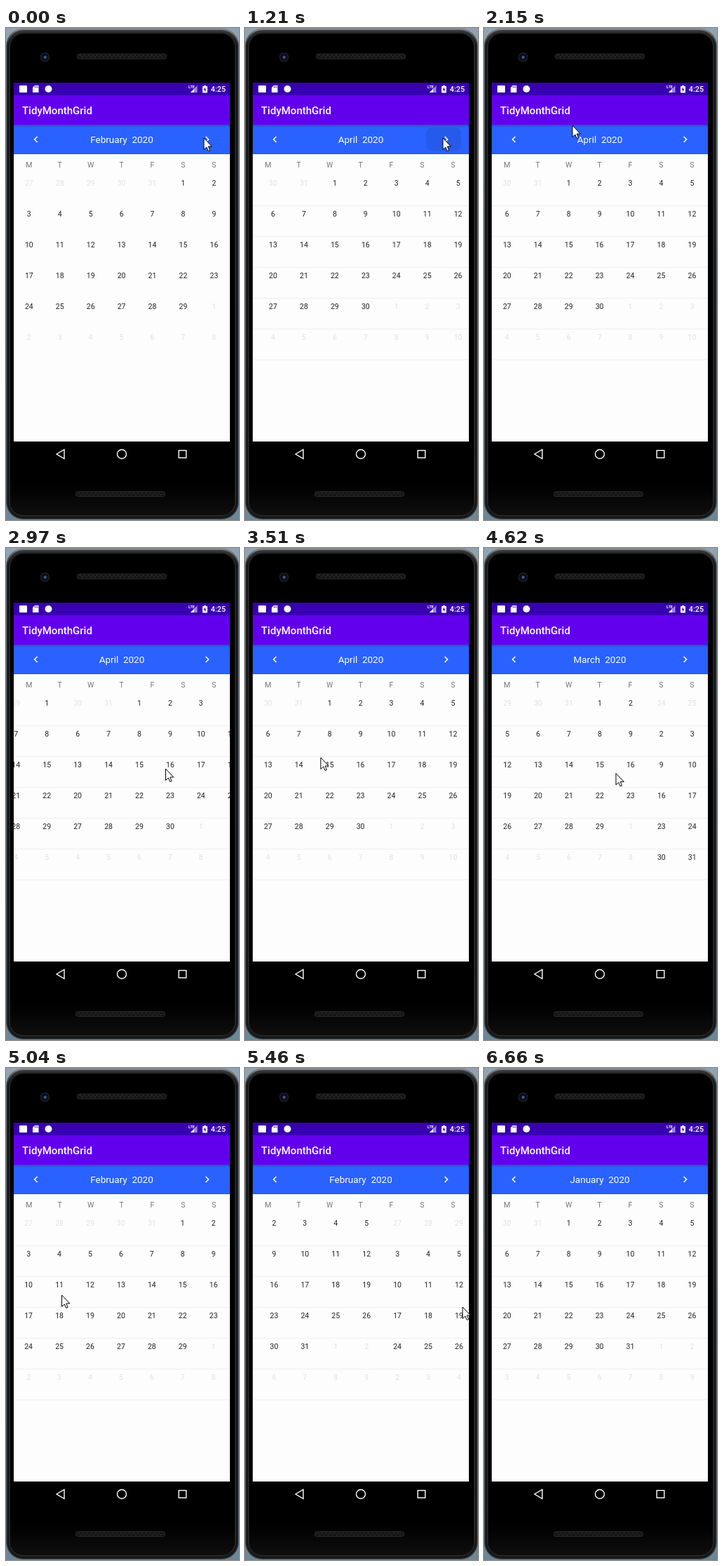
Recreate the animation shown at these times as an HTML page with a canvas. Size 332x702 px, loop 7.22 s.

```html
<!DOCTYPE html>
<html lang="en">
<head>
<meta charset="utf-8">
<title>Month pager</title>
<style>
html, body { margin: 0; width: 100%; height: 100%; overflow: hidden; background: #000; }
canvas { display: block; }
</style>
</head>
<body>
<canvas id="stage" width="332" height="702"></canvas>
<script>
const ctx = document.getElementById('stage').getContext('2d');
const LOOP = 7220, YEAR = 2020;
const STEP = 137.4, FIRST_DRAG = 2950;   // screen refresh interval and its phase, ms
const COL = 43.93, ROW = 44, PAGE = COL * 7, FIRST_X = 32.8;
const MONTHS = ['January', 'February', 'March', 'April'];

// Each gesture pulls a month aside by dx, then the page glides to its resting month.
const GESTURES = [
  { start: 0, from: 1, to: 1, dx: 0 },
  { start: 310, from: 2, to: 2, dx: 22, tap: true },
  { start: 1210, from: 3, to: 3, dx: 7.2, tap: true },
  { start: 2960, from: 3, to: 3, dx: 69.3 },
  { start: 3770, from: 3, to: 2, dx: 62 },
  { start: 4620, from: 2, to: 1, dx: 220 },
  { start: 5455, from: 1, to: 0, dx: 184.3 }
];

// Turning points of the pointer: [steps from the first drag, x, y]
const TURNS = [
  [-8, 282, 157], [-6, 126, 139], [-5, 51, 182], [-1, 69, 312], [0, 227.5, 315],
  [5, 78, 295], [7, 311, 290], [8, 248, 287], [11, 75, 318], [13, 301, 325],
  [15, 79.5, 324], [16, 70, 326], [18, 310, 341], [23, 293, 481], [26, 285, 679]
];

function pageAt(t) {
  const { start, from, to, dx, tap } = GESTURES.findLast(g => g.start <= t);
  const n = Math.floor((t - start) / STEP);
  if (n === 0) return { month: from, offset: dx, tap };
  const rest = (dx - PAGE * (from - to)) * .2 ** n;
  return { month: to, offset: Math.abs(rest) < .3 ? 0 : rest };
}

function pointerAt(t) {
  const n = Math.max(TURNS[0][0], Math.floor((t - FIRST_DRAG) / STEP));
  const i = TURNS.findLastIndex(turn => turn[0] <= n);
  const [n0, x0, y0] = TURNS[i];
  if (n === n0) return [x0, y0];
  if (i === TURNS.length - 1) return null;
  const [n1, x1, y1] = TURNS[i + 1];
  const k = (n - n0) / (n1 - n0);
  return [x0 + (x1 - x0) * k, y0 + (y1 - y0) * k];
}

function rect(x, y, w, h, fill, radius = 0) {
  ctx.fillStyle = fill;
  ctx.beginPath();
  ctx.roundRect(x, y, w, h, radius);
  ctx.fill();
}

function disc(x, y, r, fill) {
  ctx.fillStyle = fill;
  ctx.beginPath();
  ctx.arc(x, y, r, 0, 7);
  ctx.fill();
}

function shape(points, { fill, stroke, width = 1, close = true }) {
  ctx.beginPath();
  points.forEach(([x, y]) => ctx.lineTo(x, y));
  if (close) ctx.closePath();
  if (fill) { ctx.fillStyle = fill; ctx.fill(); }
  if (stroke) { ctx.strokeStyle = stroke; ctx.lineWidth = width; ctx.stroke(); }
}

function text(str, x, y, size, fill, align = 'center', weight = 400) {
  ctx.font = `${weight} ${size}px Roboto, sans-serif`;
  ctx.textAlign = align;
  ctx.fillStyle = fill;
  ctx.fillText(str, x, y);
}

function shade(y0, y1, ...colors) {
  const g = ctx.createLinearGradient(0, y0, 0, y1);
  colors.forEach((c, i) => g.addColorStop(i / (colors.length - 1), c));
  return g;
}

function speaker(x, y) {
  rect(x, y, 128, 8, '#292929', 4);
  rect(x + 1, y + 1, 126, 6, '#161616', 3);
  for (let i = 4; i < 124; i += 3) rect(x + i, y + 2 + i % 2 * 2, 1.5, 1.5, '#303030');
}

function drawPhone() {
  rect(0, 0, 332, 702, shade(0, 702, '#8fa3b3', '#6b8796'));
  rect(.5, .5, 331, 700.5, shade(0, 24, '#85878a', '#303132'), 24);
  rect(2, 3, 328, 696.5, shade(0, 24, '#3c3d3f', '#151515'), 23);
  rect(4, 6, 324, 691, '#262626', 21);
  rect(6, 8, 320, 687, '#000', 19);
  rect(6, 650, 320, 45, shade(650, 695, '#000', '#0e0e0e'), [0, 0, 19, 19]);
  speaker(101, 36.5);
  speaker(99, 661);
  disc(55.5, 41.7, 7, '#1a1b1f');
  disc(55.5, 41.7, 5, '#0b0d14');
  disc(55.8, 41.7, 2.3, '#39528c');
  shape([[72, 608], [83, 601.5], [83, 614.5]], { stroke: '#fff', width: 1.4 });
  ctx.beginPath();
  ctx.arc(165, 608, 6.5, 0, 7);
  ctx.stroke();
  ctx.strokeRect(246.2, 602.7, 10.6, 10.6);
}

function drawStatus() {
  rect(11, 78, 308, 18, '#3700b3');
  rect(19, 82, 11, 10, '#fff', 1);
  shape([[41, 82], [46.5, 82], [46.5, 92], [38, 92], [38, 85]], { fill: '#fff' });
  for (let x = 41; x < 45; x += 1.8) rect(x, 83.3, .9, 2, '#3700b3');
  disc(60.5, 87, 5, '#fff');
  text('LTE', 260, 86, 5.5, '#fff', 'left', 700);
  shape([[263, 92], [272.5, 92], [272.5, 82]], { fill: '#9d85d8' });
  shape([[263, 92], [268, 92], [268, 87]], { fill: '#fff' });
  rect(280, 83, 7, 9.5, '#fff', 1);
  rect(282, 82, 3, 2, '#fff');
  shape([[284, 84.5], [281.5, 88.3], [283.2, 88.3], [283, 91], [285.5, 87.2], [283.8, 87.2]], { fill: '#3700b3' });
  text('4:25', 302.5, 91, 10.8, '#fff', 'center', 500);
}

function drawHeader(title, pressed) {
  rect(11, 96, 308, 42, '#6200ee');
  text('TidyMonthGrid', 23, 122.7, 15, '#fff', 'left', 500);
  rect(11, 137.9, 308, 41.8, '#2962ff');
  rect(11, 138, 308, 4, shade(138, 142, 'rgba(0,0,0,.2)', 'rgba(0,0,0,0)'));
  if (pressed) rect(258, 141.5, 50, 34, 'rgba(0,0,0,.08)', 9);
  for (const [x, d] of [[42.6, 1], [286.6, -1]])
    shape([[x + 2 * d, 155], [x - 2 * d, 159], [x + 2 * d, 163]], { stroke: '#fff', width: 1.6, close: false });
  text(`${title}  ${YEAR}`, 165, 163.5, 13.5, '#fff');
}

function drawMonth(month, left) {
  const lead = (new Date(YEAR, month, 1).getDay() + 6) % 7;
  for (let i = 0; i < 42; i++) {
    const day = new Date(YEAR, month, 1 - lead + i);
    const x = FIRST_X + left + i % 7 * COL;
    const y = 225 + Math.floor(i / 7) * ROW;
    text(day.getDate(), x, y, 10.5, day.getMonth() === month ? '#212121' : '#e0e0e0');
  }
}

function drawGrid(month, offset, ruled) {
  ctx.save();
  ctx.beginPath();
  ctx.rect(11, 179.7, 308, 410.3);
  ctx.clip();
  rect(11, 179.7, 308, 410.3, '#fdfdfd');
  [...'MTWTFSS'].forEach((d, i) => text(d, FIRST_X + i * COL, 199, 10.5, '#757575'));
  if (ruled) for (let i = 0; i < 6; i++) rect(11, 253 + i * ROW, 308, 1, '#f0f0f0');
  drawMonth(month, offset);
  const side = Math.sign(offset);
  if (side) drawMonth(month - side, offset - side * PAGE);
  ctx.restore();
}

function drawPointer(x, y) {
  const arrow = [[0, 0], [0, 16.5], [3.8, 13], [6.2, 18.5], [8.6, 17.5], [6.3, 12], [11.3, 12]];
  shape(arrow.map(([dx, dy]) => [x + dx, y + dy]), { fill: '#fff', stroke: '#000' });
}

function draw() {
  const t = performance.now() % LOOP;
  const { month, offset, tap } = pageAt(t);
  const tip = pointerAt(t);
  drawPhone();
  drawStatus();
  drawHeader(MONTHS[month], tap);
  drawGrid(month, offset, t >= GESTURES[1].start);
  if (tip) drawPointer(...tip);
  requestAnimationFrame(draw);
}
draw();
</script>
</body>
</html>
```
